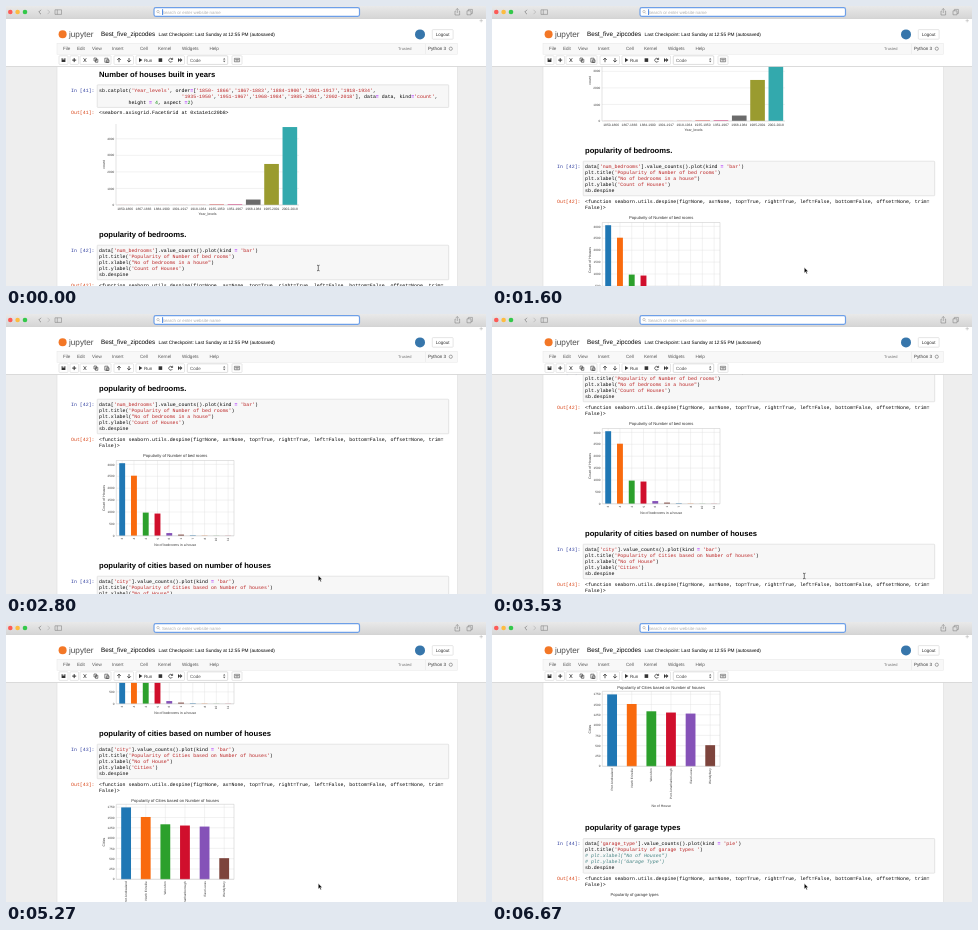
Write an HTML page that moves like this. It is 480 px wide and 280 px high and loops after 6740 ms.

```html
<!DOCTYPE html>
<html lang="en">
<head>
<meta charset="utf-8">
<title>Notebook scroll</title>
<style>
html, body { margin: 0; width: 100%; height: 100%; overflow: hidden; background: #eee; }
svg { display: block; width: 480px; height: 280px; }
text { font-family: "Liberation Sans", Arial, sans-serif; white-space: pre; text-rendering: geometricPrecision; }
.mono { font-family: "Liberation Mono", "Courier New", monospace; font-size: 4.92px; }
</style>
</head>
<body>
<svg id="stage" viewBox="0 0 480 280"></svg>
<script>
const LOOP = 6740, FRAME = 66.7, LINE = 5.97;
const TAB10 = ['#1f77b4', '#f96a0e', '#2ca02c', '#d00f2c', '#8552b8', '#7d443c'];

const esc = s => s.replace(/&/g, '&amp;').replace(/</g, '&lt;');
const text = (x, y, s, size, extra = '') =>
  `<text x="${x}" y="${y}" font-size="${size}" ${extra}>${esc(s)}</text>`;
const mid = (x, y, s, size, extra = '') => text(x, y, s, size, 'text-anchor="middle" ' + extra);
const turned = (x, y, s, size, anchor = 'middle') =>
  text(x, y, s, size, `text-anchor="${anchor}" transform="rotate(-90 ${x} ${y})"`);
const rect = (x, y, w, h, fill, extra = '') =>
  `<rect x="${x}" y="${y}" width="${w}" height="${h}" fill="${fill}" ${extra}/>`;
const dot = (x, y, r, fill) => `<circle cx="${x}" cy="${y}" r="${r}" fill="${fill}"/>`;
const path = (d, color, width = .6, fill = 'none') =>
  `<path d="${d}" stroke="${color}" stroke-width="${width}" fill="${fill}"/>`;
const mono = (x, y, body, color = '#000') =>
  `<text class="mono" x="${x}" y="${y}" fill="${color}">${body}</text>`;

const heading = (y, s) => text(93, y, s, 7.65, 'font-weight="bold"');

function highlight(line) {
  return line.split(/(#.*|'[^']*'|"[^"]*"|\b\d+\b|=)/).map((part, i) => {
    if (i % 2 === 0) return esc(part);
    const style = part[0] === '#' ? 'fill="#408080" font-style="italic"'
      : part === '=' ? 'fill="#a2f" font-weight="bold"'
      : /\d/.test(part[0]) ? 'fill="#080"' : 'fill="#ba2121"';
    return `<tspan ${style}>${esc(part)}</tspan>`;
  }).join('');
}

// y is the baseline of the first code line
function cell(n, y, code, output) {
  const outY = y + code.length * LINE + 4.8;
  return rect(91.2, y - 6.8, 351.5, code.length * LINE + 4.7, '#f7f7f7', 'stroke="#cfcfcf" stroke-width=".5" rx=".6"') +
    mono(65, y, `In [${n}]:`, '#303f9f') +
    code.map((line, i) => mono(93, y + i * LINE, highlight(line))).join('') +
    mono(65, outY, `Out[${n}]:`, '#d84315') +
    output.map((line, i) => mono(93, outY + i * LINE, esc(line))).join('');
}

// base: y of zero; unit: pixels per tick; bars are in ticks
function chart({ x, right, top, base, unit, tick, ticks, bars, colors, width, labels, flat, verticals,
                 title, titleY, xLabel, xLabelY, yLabel, yLabelY }) {
  const step = (right - x) / bars.length, center = i => x + step * (i + .5);
  const small = flat ? 3.3 : 3.1;
  let out = '';
  for (let i = 0; i <= ticks; i++) {
    const y = base - i * unit;
    out += path(`M${x} ${y}H${right}`, '#ddd', .4) +
      text(x - 1.8, y + 1.1, String(i * tick), 3.1, 'text-anchor="end"');
  }
  bars.forEach((v, i) => {
    if (verticals) out += path(`M${center(i)} ${top}V${base}`, '#ddd', .4);
  });
  bars.forEach((v, i) => {
    out += rect(center(i) - step * width / 2, base - v * unit, step * width, v * unit, colors[i % colors.length]);
    out += flat ? mid(center(i), base + 4.8, labels[i], small)
      : turned(center(i) + 1.1, base + 2, labels[i], small, 'end');
  });
  out += path(flat ? `M${x} ${top}V${base}H${right}` : `M${x} ${top}H${right}V${base}H${x}Z`, '#c4c4c4', .5);
  const cx = (x + right) / 2;
  if (title) out += mid(cx, titleY, title, 4.15);
  return `<g fill="#333">${out}${mid(cx, xLabelY, xLabel, 3.5)}${turned(98.5, yLabelY, yLabel, 3.5)}</g>`;
}

const despine = ['<function seaborn.utils.despine(fig=None, ax=None, top=True, right=True, left=False, bottom=False, offset=None, trim=', 'False)>'];
const counts = (column, kind) => `data['${column}'].value_counts().plot(kind = '${kind}')`;
const years = ['1850-1866', '1867-1883', '1884-1900', '1901-1917', '1918-1934',
  '1935-1950', '1951-1967', '1968-1984', '1985-2001', '2002-2018'];
const quoted = list => list.map(s => `'${s}'`).join(',');

const notebook =
  heading(71.4, 'Number of houses built in years') +
  cell(41, 85.6, [
    `sb.catplot('Year_levels', order=[${quoted(years.slice(0, 5)).replace('1850-', '1850- ')},`,
    ' '.repeat(28) + quoted(years.slice(5)) + `], data= data, kind='count',`,
    ' '.repeat(10) + 'height = 4, aspect =2)'
  ], ['<seaborn.axisgrid.FacetGrid at 0x1a1e1c20b8>']) +
  chart({
    x: 110, right: 293, top: 118, base: 199, unit: 16.55, tick: 1000, ticks: 4, flat: true, width: .8,
    bars: [.005, .005, .005, .005, .01, .03, .04, .33, 2.48, 4.71], labels: years,
    colors: ['#c33', '#c33', '#c33', '#c33', '#c33', '#d33', '#d8387c', '#6b6b6b', '#9a9b2f', '#33a9ad'],
    xLabel: 'Year_levels', xLabelY: 209, yLabel: 'count', yLabelY: 158.5
  }) +
  heading(231.4, 'popularity of bedrooms.') +
  cell(42, 246, [
    counts('num_bedrooms', 'bar'),
    "plt.title('Popularity of Number of bed rooms')",
    'plt.xlabel("No of bedrooms in a house")',
    "plt.ylabel('Count of Houses')",
    'sb.despine'
  ], despine) +
  chart({
    x: 110.3, right: 228, top: 300.5, base: 375.8, unit: 11.9, tick: 500, ticks: 6, width: .5, verticals: true,
    bars: [6.1, 5.05, 1.95, 1.87, .23, .1, .04, .02, .01, .01], colors: TAB10,
    labels: ['3', '4', '2', '5', '6', '1', '7', '8', '10', '11'],
    title: 'Popularity of Number of bed rooms', titleY: 297.4,
    xLabel: 'No of bedrooms in a house', xLabelY: 386, yLabel: 'Count of Houses', yLabelY: 338
  }) +
  heading(408.4, 'popularity of cities based on number of houses') +
  cell(43, 423, [
    counts('city', 'bar'),
    "plt.title('Popularity of Cities based on Number of houses')",
    'plt.xlabel("No of House")',
    "plt.ylabel('Cities')",
    'sb.despine'
  ], despine) +
  chart({
    x: 110.3, right: 228, top: 476.3, base: 551.3, unit: 10.3, tick: 250, ticks: 7, width: .5, verticals: true,
    bars: [6.98, 6.05, 5.34, 5.22, 5.12, 2.05], colors: TAB10,
    labels: ['Port Andrealand', 'North Erinville', 'West Ann', 'Port Jonathanborough', 'East Lucas', 'Wendybury'],
    title: 'Popularity of Cities based on Number of houses', titleY: 474.4,
    xLabel: 'No of House', xLabelY: 592.3, yLabel: 'Cities', yLabelY: 514
  }) +
  heading(615.4, 'popularity of garage types') +
  cell(44, 630.4, [
    counts('garage_type', 'pie'),
    "plt.title('Popularity of garage types ')",
    '# plt.xlabel("No of Houses")',
    "# plt.ylabel('Garage Type')",
    'sb.despine'
  ], despine) +
  mid(142.5, 681.4, 'Popularity of garage types', 4.15, 'fill="#333"');

const menu = [['File', 57], ['Edit', 71], ['View', 86], ['Insert', 106], ['Cell', 134],
  ['Kernel', 152], ['Widgets', 176], ['Help', 203.5]];
const buttons = [[53, 9], [64, 8.5], [74, 31], [108, 19.5], [130, 48.5]];

const browserBar =
  rect(0, 0, 480, 12.5, 'url(#bar)') + path('M0 12.5H480', '#bdbdbd', .5) +
  dot(4.3, 6, 2.3, '#fc5b57') + dot(11.6, 6, 2.3, '#fdbc40') + dot(19, 6, 2.3, '#34c84a') +
  path('M35 3.8L32.8 6L35 8.2', '#666') + path('M41.5 3.8L43.7 6L41.5 8.2', '#aaa') +
  path('M49 3.8H55.5V8.4H49ZM51.3 3.8V8.4', '#777', .5) +
  rect(148, 1.6, 205.5, 8.8, '#fff', 'rx="1.8" stroke="#6d9fe8" stroke-width="1.2"') +
  '<circle cx="152" cy="5.6" r="1.2" fill="none" stroke="#999" stroke-width=".5"/>' +
  path('M152.9 6.5L154 7.7', '#999', .5) +
  text(156, 7.6, 'Search or enter website name', 4.4, 'fill="#b0b0b0"') +
  '<path id="caret" d="M156.6 3.2V9" stroke="#3478e0" stroke-width=".9"/>' +
  path('M449.8 5H449V9H453.6V5H452.8M451.3 7V2.6M450 3.8L451.3 2.5L452.6 3.8', '#777', .5) +
  path('M461 4.8H465V8.8H461ZM462.4 4.8V3.4H466.4V7.4H465', '#777', .5) +
  path('M473.5 14.7H477M475.2 13V16.4', '#999', .4);

const header =
  rect(0, 12, 480, 48.5, '#fff') + path('M0 60.5H480', '#d4d4d4', .8) +
  dot(56.6, 28.3, 4, '#f37726') + text(63, 30.8, 'jupyter', 8.2, 'fill="#4e4e4e"') +
  text(95, 30.4, 'Best_five_zipcodes', 6.3) +
  text(152.5, 30.4, 'Last Checkpoint: Last Sunday at 12:55 PM (autosaved)', 4.75) +
  dot(414, 28.4, 5, '#3776ab') +
  rect(426.3, 23.6, 20.8, 9.6, '#fff', 'rx=".8" stroke="#ccc" stroke-width=".5"') + mid(436.7, 30, 'Logout', 4.5, 'fill="#333"') +
  rect(51, 37.3, 400.5, 11, '#f8f8f8', 'stroke="#e7e7e7" stroke-width=".5"') +
  menu.map(([label, x]) => text(x, 44.3, label, 4.57, 'fill="#555"')).join('') +
  text(392, 44.2, 'Trusted', 4, 'fill="#777"') + path('M419.5 38V48', '#ddd', .4) +
  text(422, 44.3, 'Python 3', 4.57, 'fill="#333"') +
  '<circle cx="444.8" cy="42.7" r="1.6" fill="none" stroke="#555" stroke-width=".5"/>' +
  buttons.map(([x, w]) => rect(x, 49.8, w, 8.6, '#fff', 'rx=".7" stroke="#ccc" stroke-width=".5"')).join('') +
  rect(55.6, 52.2, 3.8, 3.8, '#333') + rect(56.5, 52.2, 2, 1.3, '#fff') +
  path('M66.2 54.1H70.2M68.2 52.1V56.1', '#333', 1) +
  path('M77.5 52.2L80.3 56M80.3 52.2L77.5 56', '#333', .7) +
  path('M88 52H90.4V55H88ZM89.5 53.3H91.8V56.3H89.5Z', '#333', .6, '#fff') +
  path('M98.8 52.2H102V56.2H98.8ZM100.4 53.8H103V56.5H100.4Z', '#333', .6, '#fff') +
  path('M113 56.2V52.2M111.2 54L113 52.1L114.8 54', '#333', .8) +
  path('M123 52V56M121.2 54.3L123 56.1L124.8 54.3', '#333', .8) +
  path('M133 52L136.4 54.1L133 56.2Z', 'none', 0, '#333') + text(138, 55.8, 'Run', 4.5, 'fill="#333"') +
  rect(152.6, 52.3, 3.6, 3.6, '#333') +
  path('M166.3 53.2A1.9 1.9 0 1 0 166.4 55M166.6 51.8V53.5H164.9', '#333', .7) +
  path('M172 52L174.2 54.1L172 56.2ZM174.2 52L176.4 54.1L174.2 56.2Z', 'none', 0, '#333') +
  rect(181.3, 49.8, 40.4, 8.6, '#fff', 'rx=".7" stroke="#bbb" stroke-width=".5"') +
  text(184, 55.7, 'Code', 4.5, 'fill="#555"') +
  path('M217 53.5L218.2 52L219.4 53.5ZM217 54.7L218.2 56.2L219.4 54.7Z', 'none', 0, '#555') +
  rect(226, 49.8, 10, 8.6, '#fff', 'rx=".7" stroke="#ccc" stroke-width=".5"') +
  path('M228.4 52.3H233.6V55.8H228.4ZM229.2 53.5H232.9M229.6 54.8H232.5', '#333', .5);

const pointers =
  '<path id="arrow" d="M312.3 261.6V267L313.6 265.8L314.5 267.8L315.4 267.4L314.5 265.5H316.2Z" fill="#000" stroke="#fff" stroke-width=".4"/>' +
  '<path id="beam" d="M311 259.2Q312.3 259.2 312.3 260V264Q312.3 264.8 311 264.8M313.6 259.2Q312.3 259.2 312.3 260M312.3 264Q312.3 264.8 313.6 264.8" fill="none" stroke="#222" stroke-width=".6"/>';

document.getElementById('stage').innerHTML =
  `<defs><linearGradient id="bar" x2="0" y2="1"><stop stop-color="#e9e9e9"/><stop offset="1" stop-color="#d5d5d5"/></linearGradient></defs>` +
  rect(0, 0, 480, 280, '#eee') + rect(51, 60, 400.5, 221, '#fff', 'stroke="#ddd" stroke-width=".6"') +
  `<g id="page">${notebook}</g>` + header + browserBar + pointers;

// [time, scroll offset]
const scrollKeys = [[0, 0], [333, 0], [1600, 84], [2270, 105], [2530, 105], [2800, 154], [3200, 178], [3330, 178],
  [3530, 190], [4470, 258], [5070, 292], [5200, 292], [5270, 294], [5800, 352], [6060, 352], [6670, 407], [LOOP, 407]];
function scrollAt(t) {
  const i = scrollKeys.findIndex(([time]) => time > t);
  const [t0, s0] = scrollKeys[i - 1], [t1, s1] = scrollKeys[i];
  return Math.round(s0 + (s1 - s0) * (t - t0) / (t1 - t0));
}

const [page, caret, arrow, beam] = ['page', 'caret', 'arrow', 'beam'].map(id => document.getElementById(id));
const show = (node, on) => node.setAttribute('visibility', on ? 'visible' : 'hidden');

function draw(now) {
  const t = Math.floor((now % LOOP + 5) / FRAME) * FRAME % LOOP;
  const s = scrollAt(t);
  page.setAttribute('transform', `translate(0 ${-s})`);
  show(caret, (t + 480) % 1000 < 546);
  const overCode = s < 13 || (s > 156 && s < 205) || (s > 360 && s < 397);
  show(beam, overCode);
  show(arrow, !overCode);
}

let start;
function tick(now) {
  start ??= now;
  draw(now - start);
  requestAnimationFrame(tick);
}
draw(0);
requestAnimationFrame(tick);
</script>
</body>
</html>
```
